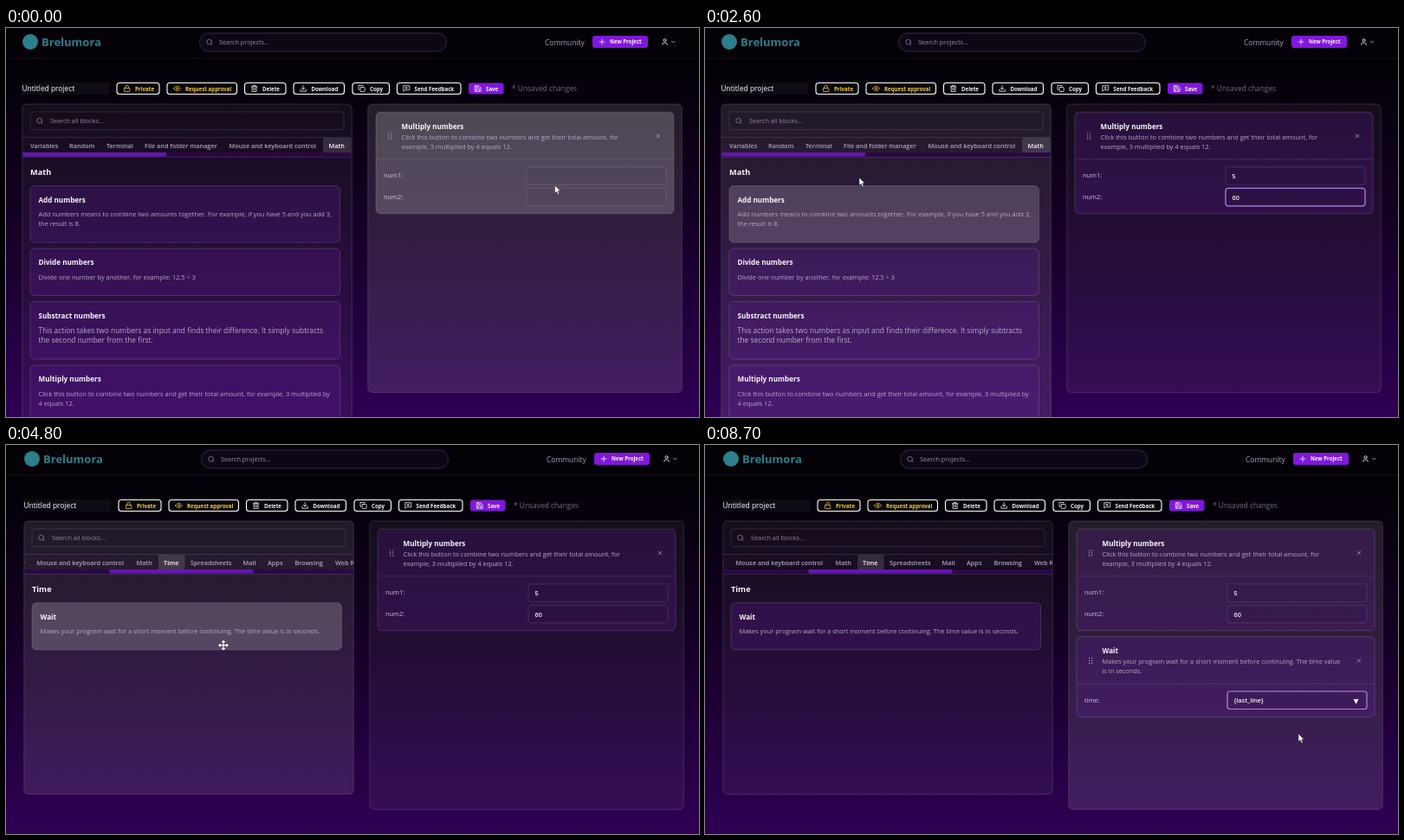
An HTML page that plays this animation: 800 by 450 pixels, repeating every 8.8 s.

```html
<!DOCTYPE html>
<html lang="en">
<head>
<meta charset="utf-8">
<title>Block editor</title>
<style>
html, body { margin: 0; width: 100%; height: 100%; overflow: hidden; background: #000; }
svg { display: block; width: 100vw; height: 100vh; font-family: "Open Sans", "Noto Sans", sans-serif; }
.icon { fill: none; stroke-width: 2.2; stroke-linecap: round; stroke-linejoin: round; }
.edge { fill: none; stroke: #fff; stroke-opacity: .18; stroke-width: .8; }
.field { fill: #14051f; fill-opacity: .06; stroke: #fff; stroke-opacity: .14; stroke-width: .8; }
.ring { fill: none; stroke: #a981e0; stroke-width: 1.2; }
</style>
</head>
<body>
<svg id="stage" viewBox="0 0 800 450" preserveAspectRatio="none"></svg>
<script>
const LOOP = 8800, SWITCH = 3900, DROP = 5200, FOCUS = 5550, PICK = 6550;
const WHITE = '#f8f5fb', DIM = '#b9a9c6', TAB = '#b0a3bb', YELLOW = '#f5d033', PURPLE = '#8017dc';

const icons = {
  lock: '<rect x="3" y="11" width="18" height="11" rx="2"/><path d="M7 11V7a5 5 0 0 1 10 0v4"/>',
  eye: '<path d="M1 12s4-7 11-7 11 7 11 7-4 7-11 7S1 12 1 12z"/><circle cx="12" cy="12" r="3"/>',
  trash: '<path d="M3 6h18M19 6v16H5V6M8 6V2h8v4M10 11v6M14 11v6"/>',
  download: '<path d="M21 15v6H3v-6M7 10l5 5 5-5M12 15V3"/>',
  copy: '<rect x="8" y="8" width="14" height="14" rx="2"/><path d="M4 16H2V2h14v2"/>',
  chat: '<path d="M21 17H7l-4 4V3h18zM12 7v6M9 10h6"/>',
  save: '<path d="M21 21H3V3h13l5 5zM17 21v-8H7v8M7 3v5h8"/>',
  plus: '<path d="M4 12h16M12 4v16"/>',
  user: '<circle cx="12" cy="7" r="4"/><path d="M19 21v-2a4 4 0 0 0-4-4H9a4 4 0 0 0-4 4v2"/>',
  chevron: '<path d="M6 9l6 6 6-6"/>',
  search: '<circle cx="11" cy="11" r="8"/><path d="M21 21l-4.3-4.3"/>',
  close: '<path d="M6 6l12 12M18 6L6 18"/>'
};

// Text placed by its left edge and visual middle line.
const text = (x, y, str, size = 7.4, weight = 400, fill = WHITE, extra = '') =>
  `<text x="${x}" y="${y + size * .36}" font-size="${size}" font-weight="${weight}" fill="${fill}" ${extra}>${str}</text>`;
const rect = (x, y, w, h, r, attrs) =>
  `<rect x="${x}" y="${y}" width="${w}" height="${h}" rx="${r}" ${attrs}/>`;
const icon = (name, x, y, color = WHITE, size = 8.6) =>
  `<g class="icon" stroke="${color}" transform="translate(${x - size / 2} ${y - size / 2}) scale(${size / 24})">${icons[name]}</g>`;

const button = (x, w, name, label, textX, color = WHITE) =>
  rect(x, 63.5, w, 13, 3, label === 'Save' ? `fill="${PURPLE}"` : 'fill="#050208" stroke="#fff" stroke-width="1.1"') +
  icon(name, textX - 9.4, 70, color) + text(textX, 70.3, label, 6.15, 700, color);

const box = (id, x, y, w, h) =>
  rect(x, y, w, h, 5, `id="${id}Base" fill="#581c87" fill-opacity=".3"`) +
  rect(x, y, w, h, 5, `id="${id}Hover" fill="#fff" opacity="0"`) +
  rect(x, y, w, h, 5, 'class="edge"');

const block = (id, y, h, title, lines, size = 7.4) =>
  box(id, 28, y, 357.5, h) + text(37.5, y + 16.5, title, 8.15, 700) +
  lines.map((line, i) => text(37.5, y + 33 + i * 11.3, line, size, 400, DIM)).join('');

const grip = y => [0, 1, 2, 3, 4, 5].map(i =>
  `<circle cx="${441.7 + i % 2 * 3}" cy="${y - 2.8 + (i >> 1) * 2.8}" r=".7" fill="#c0b0cc"/>`).join('');

const step = (id, y, h, title, lines) =>
  box(id, 427, y, 344, h) + grip(y + 27.7) + icon('close', 753, y + 27.7, '#bbaac8', 7.5) +
  text(456.5, y + 16.7, title, 8.1, 700) +
  lines.map((line, i) => text(456.5, y + 28.8 + i * 11, line, 7.4, 400, DIM)).join('') +
  `<path d="M427 ${y + 54.5}h344" stroke="#fff" stroke-opacity=".12" stroke-width=".8"/>`;

const field = (id, y, label) =>
  text(436, y + 10, label, 7.4, 400, '#d2c6dc') + rect(601, y, 161, 20.5, 3, 'class="field"') +
  rect(601, y, 161, 20.5, 3, `id="${id}Ring" class="ring"`) +
  text(608.5, y + 10.6, '', 7.3, 600, WHITE, `id="${id}Text"`) +
  rect(608.3, y + 5, .9, 10.5, 0, `id="${id}Caret" fill="#fff"`);

const panel = (id, x, w, h) =>
  rect(x, 88, w, h, 5, `id="${id}" fill="#fff"`) + rect(x, 88, w, h, 5, `id="${id}Edge" class="edge"`);

const tabs = [['Variables', 28], ['Random', 73], ['Terminal', 116], ['File and folder manager', 160],
  ['Mouse and keyboard control', 257.5], ['Math', 372.5], ['Time', 404], ['Spreadsheets', 435],
  ['Mail', 495.5], ['Apps', 524], ['Browsing', 555.5], ['Web Requests', 602]];

const waitLine = 'Makes your program wait for a short moment before continuing. The time value';

document.getElementById('stage').innerHTML = `
<defs>
  <linearGradient id="night" x1="0" y1="0" x2="0" y2="1">
    <stop offset=".08" stop-color="#020004"/><stop offset=".5" stop-color="#150026"/><stop offset="1" stop-color="#2e0053"/>
  </linearGradient>
  <clipPath id="tabClip"><rect x="19" y="126" width="380" height="24"/></clipPath>
</defs>
<rect width="800" height="450" fill="url(#night)"/>
<rect width="800" height="35" fill="#040207"/>
<path d="M0 35h800" stroke="#17111c"/>
<g id="page">
  <circle cx="28" cy="16" r="9" fill="#2c7f8c"/>
  ${text(41, 16, 'Brelumora', 13, 700, '#2c7f8c')}
  ${rect(223.5, 6, 285, 21, 10.5, 'fill="#0d0714" stroke="#3c2a58" stroke-width=".9"')}
  ${icon('search', 235, 16.5, '#8f7aa8')}
  ${text(246, 16.8, 'Search projects...', 7.3, 400, '#9e8fae')}
  ${text(622, 17.1, 'Community', 8.45, 400, '#a99bb6')}
  ${rect(677, 9, 64, 14, 3, `fill="${PURPLE}"`)}
  ${icon('plus', 688, 16)} ${text(697, 16.3, 'New Project', 6.1, 700)}
  ${icon('user', 760.5, 16, WHITE, 9)} ${icon('chevron', 770.3, 16, WHITE, 7)}

  ${rect(18, 63, 101, 14, 1, 'fill="#100c13"')}
  ${text(18.5, 70.3, 'Untitled project', 8.4, 500)}
  ${button(128, 49, 'lock', 'Private', 149, YELLOW)}
  ${button(186, 80.5, 'eye', 'Request approval', 207, YELLOW)}
  ${button(275.5, 47.5, 'trash', 'Delete', 296)}
  ${button(332, 58.5, 'download', 'Download', 352.5)}
  ${button(400, 42.5, 'copy', 'Copy', 420)}
  ${button(451.5, 73.5, 'chat', 'Send Feedback', 471.5)}
  ${button(534, 40.5, 'save', 'Save', 554)}
  ${text(584, 70.3, '* Unsaved changes', 8.4, 400, '#75697f')}

  ${panel('left', 18.8, 380.5, 380)}
  ${rect(28, 97, 362, 20.5, 3, 'class="field"')}
  ${icon('search', 39, 107.5, '#8f7fa0')}
  ${text(51, 107.8, 'Search all blocks...', 7.3, 400, '#9585a4')}
  <path d="M19 126.5h380M19 149.5h380" stroke="#fff" stroke-opacity=".13" stroke-width=".8"/>
  <g clip-path="url(#tabClip)">
    <rect x="19" y="144" width="380" height="5" fill="#2a0848"/>
    <g id="tabs">
      <rect id="active" y="127" height="17" fill="#fff" fill-opacity=".13"/>
      ${tabs.map(([name, x]) => text(x, 136, name, 7.3, 600, TAB, 'class="tab"')).join('')}
    </g>
    <rect id="thumb" y="144" width="166" height="4.6" rx="1" fill="#6416b2"/>
  </g>
  <g id="mathView">
    ${text(28, 166.5, 'Math', 9.2, 700)}
    ${block('add', 182.5, 65.5, 'Add numbers', ['Add numbers means to combine two amounts together. For example, if you have 5 and you add 3,', 'the result is 8.'])}
    ${block('divide', 255, 54.5, 'Divide numbers', ['Divide one number by another, for example: 12.5 ÷ 3'])}
    ${block('sub', 316.5, 66.5, 'Substract numbers', ['This action takes two numbers as input and finds their difference. It simply subtracts', 'the second number from the first.'], 8.4)}
    ${block('mul', 390, 66, 'Multiply numbers', ['Click this button to combine two numbers and get their total amount, for example, 3 multiplied by', '4 equals 12.'])}
  </g>
  <g id="timeView">
    ${text(28, 166.5, 'Time', 9.2, 700)}
    ${block('wait', 182.5, 54.5, 'Wait', [waitLine + ' is in seconds.'])}
  </g>

  ${panel('right', 417.8, 362.5, 333.5)}
  ${step('product', 97.2, 117.5, 'Multiply numbers', ['Click this button to combine two numbers and get their total amount, for', 'example, 3 multiplied by 4 equals 12.'])}
  ${field('first', 160.8, 'num1:')}
  ${field('second', 185.3, 'num2:')}
  <g id="pauseView">
    ${step('pause', 221.7, 92.8, 'Wait', [waitLine, 'is in seconds.'])}
    ${field('time', 285, 'time:')}
    <path d="M746.7 294h5.8l-2.9 5.8z" fill="#fff"/>
  </g>
  <g id="menu">
    ${rect(657.5, 311.5, 85, 31, 2, 'fill="#000" fill-opacity=".3"')}
    ${rect(658.3, 312.3, 83.5, 29, 1.5, 'fill="#313032"')}
    ${text(663.5, 321.7, '{last_line}', 6.9, 700)}
    ${text(663.5, 333, 'last_line', 6.4, 400, '#d8d4da')}
  </g>
</g>
<g id="cursor">
  <path id="arrow" d="M0 0v9.2l2.1-1.9 1.6 3.4 1.6-.7-1.6-3.3h2.9z" fill="#fff" stroke="#111" stroke-width=".5"/>
  <path id="beam" d="M-1.8-4.8h1.3l.5.6.5-.6h1.3M0-4.2v8.4M-1.8 4.8h1.3l.5-.6.5.6h1.3" fill="none" stroke="#fff" stroke-width=".9"/>
  <path id="move" d="M-5 0H5M0-5V5M-3.4-1.7L-5 0l1.6 1.7M3.4-1.7L5 0 3.4 1.7M-1.7-3.4L0-5l1.7 1.6M-1.7 3.4L0 5l1.7-1.6" fill="none" stroke="#fff" stroke-width="1.2"/>
</g>`;

const $ = id => document.getElementById(id);
const clamp = v => Math.max(0, Math.min(1, v));
const ease = v => v * v * (3 - 2 * v);
const within = (t, ...spans) => spans.some(([a, b]) => t >= a && t < b);
const fade = (t, ...spans) => Math.max(...spans.map(([a, b]) => clamp((t - a) / 150) * clamp((b + 150 - t) / 150)));
const show = (id, on) => $(id).style.display = on ? '' : 'none';
const set = (id, name, value) => $(id).setAttribute(name, value);

// Pointer stops: time, x, y.
const path = [[0, 633.5, 182], [100, 633.5, 182], [300, 634, 173], [900, 634, 175], [2000, 634, 175],
  [2400, 205, 200], [2600, 178, 173], [2800, 150, 146], [2900, 150, 146], [3500, 248, 146],
  [3800, 191, 137], [4050, 191, 137], [4450, 198, 226], [4700, 198, 226], [5150, 610, 270],
  [5400, 674.5, 300], [5750, 674.5, 300], [6350, 684, 334], [6600, 684, 334], [6750, 685, 334], [LOOP, 685, 334]];

function pointer(t) {
  const i = path.findIndex(p => p[0] > t);
  const [a, b] = [path[i - 1], path[i]];
  const k = ease((t - a[0]) / (b[0] - a[0]));
  return [a[1] + (b[1] - a[1]) * k, a[2] + (b[2] - a[2]) * k];
}

function hover(id, amount) {
  set(id + 'Base', 'opacity', 1 - amount);
  set(id + 'Hover', 'opacity', amount * .19);
}

function input(id, value, focused, caret) {
  show(id + 'Ring', focused);
  show(id + 'Caret', focused && caret);
  $(id + 'Text').textContent = value;
  const width = value ? $(id + 'Text').getComputedTextLength() : 0;
  set(id + 'Caret', 'x', 608.3 + width);
}

function render(t) {
  const timed = t >= SWITCH;
  set('page', 'transform', `translate(${timed ? 2 : 0} 0)`);
  show('mathView', !timed);
  show('timeView', timed);
  for (const id of ['left', 'leftEdge']) set(id, 'height', timed ? 316 : 380);

  const scroll = 224 * ease(clamp((t - 2900) / 600));
  set('tabs', 'transform', `translate(${-scroll} 0)`);
  set('thumb', 'x', 19 + scroll * 98.5 / 224);
  set('active', 'x', timed ? 398 : 366);
  set('active', 'width', timed ? 30.5 : 32.5);
  document.querySelectorAll('.tab').forEach((tab, i) =>
    tab.setAttribute('fill', i === (timed ? 6 : 5) ? WHITE : TAB));

  // The open menu covers the panel, so its hover pauses until a choice is made.
  set('left', 'opacity', .05 + .055 * fade(t, [2150, 4900]));
  set('right', 'opacity', .05 + .065 * fade(t, [-200, 2100], [4950, 5900], [PICK, 9000]));
  hover('product', fade(t, [-200, 2080]));
  hover('add', fade(t, [2300, 2580]));
  hover('wait', fade(t, [4250, 4800]));
  hover('pause', fade(t, [DROP - 50, 5900]));

  const blink = since => (t - since) % 1000 < 500;
  input('first', t >= 700 ? '5' : '', within(t, [350, 1150]), blink(t < 700 ? 350 : 700));
  input('second', t >= 1700 ? '60' : t >= 1500 ? '6' : '', within(t, [1150, 2800]),
    blink(t < 1500 ? 1150 : t < 1700 ? 1500 : 1700));
  show('pauseView', t >= DROP);
  input('time', t >= PICK ? '{last_line}' : '', t >= FOCUS,
    t < PICK ? blink(FOCUS) : within(t, [7150, 7750], [8200, 8690]));
  show('menu', within(t, [5600, PICK]));

  const [x, y] = pointer(t);
  const beam = within(t, [150, 2080], [5300, 5900]);
  const move = within(t, [4250, DROP]);
  show('beam', beam);
  show('move', move);
  show('arrow', !beam && !move);
  set('cursor', 'transform', `translate(${x} ${y})`);
}

function tick(now) {
  render(now % LOOP);
  requestAnimationFrame(tick);
}
render(0);
requestAnimationFrame(tick);
</script>
</body>
</html>
```
